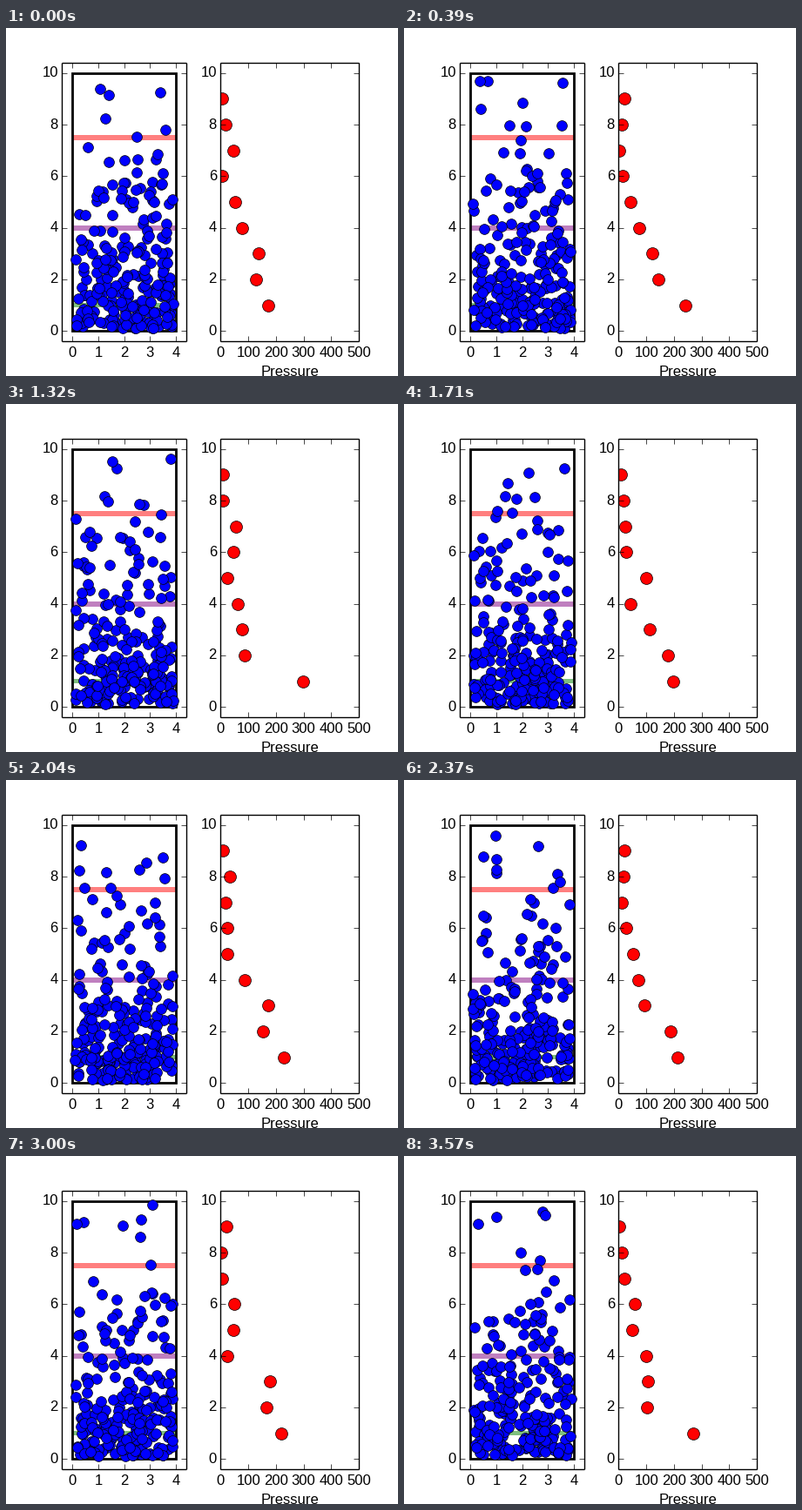
A matplotlib script for the animation above (3600 ms loop, 450 by 400 pixels).

```python
import numpy as np
import matplotlib.pyplot as plt
from matplotlib.animation import FuncAnimation

plt.style.use("classic")
plt.rcParams.update({
    "font.family": "Liberation Sans",
    "font.size": 12,
    "figure.dpi": 100,
    "savefig.dpi": 100,
    "figure.facecolor": "white",
    "ytick.major.pad": 3.3,
})

FRAMES, INTERVAL = 120, 30
COUNT = 240
WIDTH, HEIGHT, RADIUS = 4, 10, 0.1
TEMPERATURE, SCALE_HEIGHT = 3.4, 2.3
GRAVITY = TEMPERATURE / SCALE_HEIGHT
DT = INTERVAL / 1000
LEVELS = np.arange(1, 10)


def start_state(rng):
    """Gas in equilibrium: barometric heights, thermal velocities."""
    span = HEIGHT - 2 * RADIUS
    share = 1 - np.exp(-span / SCALE_HEIGHT)
    x = rng.uniform(RADIUS, WIDTH - RADIUS, COUNT)
    y = RADIUS - SCALE_HEIGHT * np.log(1 - share * rng.random(COUNT))
    vel = rng.normal(0, np.sqrt(TEMPERATURE), (COUNT, 2))
    return np.column_stack([x, y]), vel


def bounce(pos, vel):
    for axis, size in enumerate((WIDTH, HEIGHT)):
        p, v = pos[:, axis], vel[:, axis]
        low, high = p < RADIUS, p > size - RADIUS
        p[low] = 2 * RADIUS - p[low]
        p[high] = 2 * (size - RADIUS) - p[high]
        v[low | high] *= -1


def slab_pressure(pos, vel):
    """Sum of squared vertical speeds in the unit slab around each level."""
    inside = np.abs(pos[:, 1] - LEVELS[:, None]) < 0.5
    return inside @ vel[:, 1] ** 2


def simulate():
    pos, vel = start_state(np.random.default_rng(4))
    path, pressure = [], []
    for _ in range(FRAMES):
        path.append(pos.copy())
        pressure.append(slab_pressure(pos, vel))
        pos += vel * DT
        pos[:, 1] -= GRAVITY * DT ** 2 / 2
        vel[:, 1] -= GRAVITY * DT
        bounce(pos, vel)
    return path, pressure


path, pressure = simulate()

fig, (box_ax, plot_ax) = plt.subplots(1, 2, figsize=(4.5, 4))
fig.subplots_adjust(left=0.125, right=0.9, bottom=0.1, top=0.9, wspace=0.2)

box_ax.set_aspect("equal", adjustable="box")
box_ax.set(xlim=(-0.4, 4.4), xticks=range(5))
plot_ax.set(xlim=(0, 500), xticks=range(0, 501, 100), xlabel="Pressure")
for ax in (box_ax, plot_ax):
    ax.set(ylim=(-0.4, 10.4), yticks=range(0, 11, 2))
    for spine in ax.spines.values():
        spine.set_capstyle("butt")

for level, color in ((7.5, "red"), (4, "purple"), (1, "green")):
    box_ax.add_patch(plt.Rectangle((0, level - 0.1), WIDTH, 0.2,
                                   fc=color, ec="none", alpha=0.5))
box_ax.add_patch(plt.Rectangle((0, 0), WIDTH, HEIGHT, fill=False, lw=2))

particles, = box_ax.plot([], [], "bo", ms=8.5)
gauges, = plot_ax.plot([], [], "ro", ms=10)


def draw(step):
    particles.set_data(path[step].T)
    gauges.set_data(pressure[step], LEVELS)
    return particles, gauges


anim = FuncAnimation(fig, draw, frames=FRAMES, interval=INTERVAL,
                     repeat=True, repeat_delay=0)
plt.show()
```
